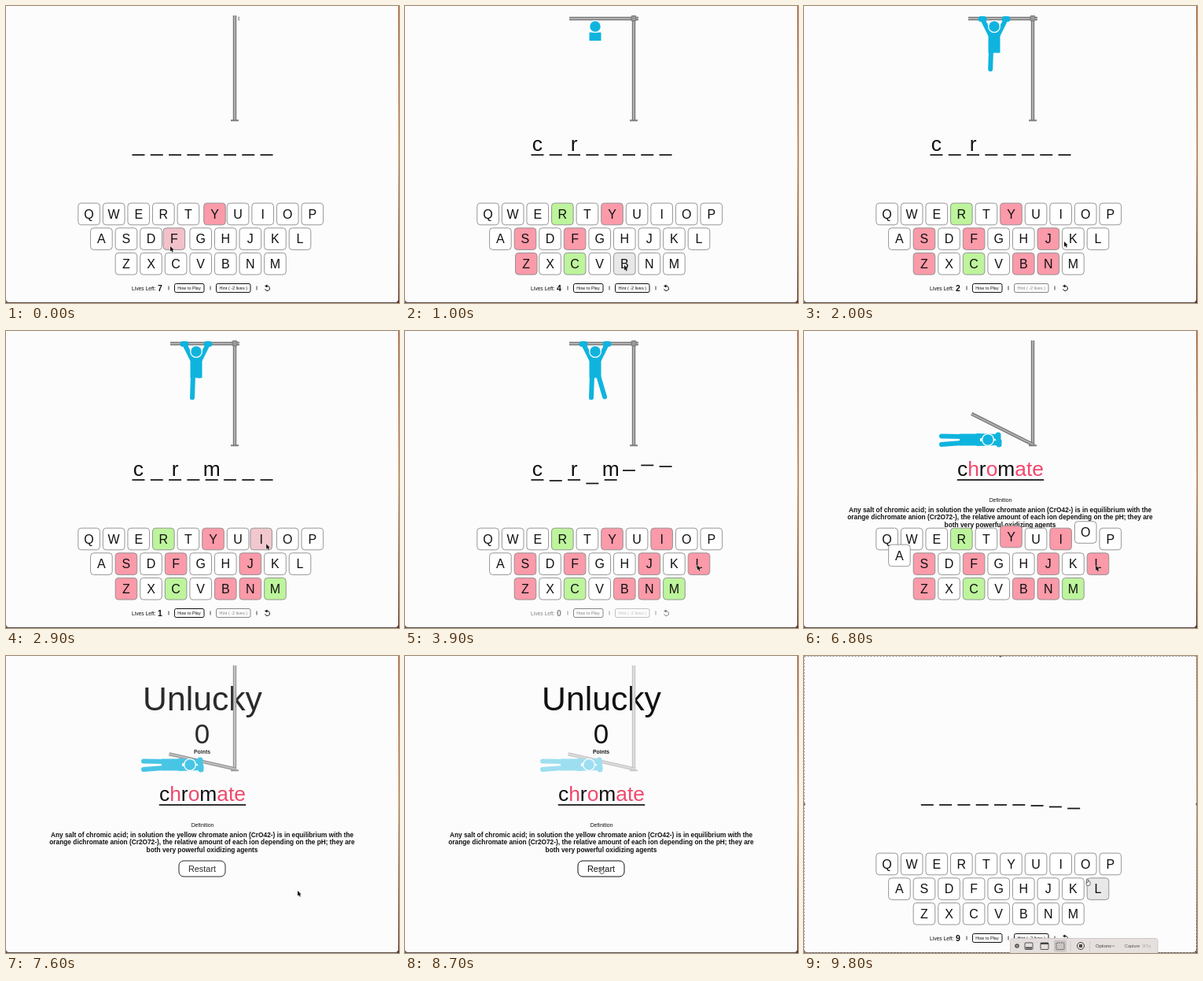
Animation, 500 px wide and 377 px high, one loop 9900 ms. Source, as an HTML page with a canvas:

```html
<!DOCTYPE html>
<html lang="en">
<head>
<meta charset="utf-8">
<title>Word game</title>
<style>
  html, body { margin: 0; height: 100%; overflow: hidden; background: #fcfcfc; }
  canvas { display: block; }
</style>
</head>
<body>
<canvas id="stage" width="500" height="377"></canvas>
<script>
const ctx = document.getElementById("stage").getContext("2d");
const LOOP = 9900, STEP = 100, RESTART = 8900;
const BG = [252, 252, 252], RED = [251, 154, 169], GREEN = [189, 244, 156];
const HOVER = [232, 232, 232], BLUE = [15, 180, 222], INK = "#111";
const WORD = "chromate", ROWS = ["QWERTYUIOP", "ASDFGHJKL", "ZXCVBNM"];
const DEFINITION = [
  "Any salt of chromic acid; in solution the yellow chromate anion (CrO42-) is in equilibrium with the",
  "orange dichromate anion (Cr2O72-), the relative amount of each ion depending on the pH; they are",
  "both very powerful oxidizing agents"
];
const PRESSED = { Y: -300, F: -60, S: 200, R: 450, Z: 650, C: 800, B: 1000,
                  N: 1180, J: 1400, M: 2400, I: 2850, L: 3300 };
const isHit = key => WORD.includes(key.toLowerCase());
const MISSES = Object.keys(PRESSED).filter(k => !isHit(k)).map(k => PRESSED[k]);
const DROP = { A: 6667, O: 6727, Y: 6780 };

// Tracks: time followed by values
const POINTER = [[0, 209, 306], [200, 152, 300], [450, 200, 268], [650, 153, 330], [800, 216, 330],
  [1000, 279, 330], [1180, 310, 330], [1400, 310, 300], [1700, 312, 300], [2000, 331, 300],
  [2400, 342, 330], [2850, 326, 268], [3300, 372, 298], [7700, 371, 299], [8400, 250, 272],
  [8900, 250, 272], [9500, 361, 287]];
const BODY = [[4350, 242, 46.5, 0], [4700, 237, 53, 25], [5000, 231.5, 70, 73],
  [5300, 222, 100, 85], [5600, 211, 138, 90]];
// head, left hand, right hand, left foot, right foot
const LIMBS = [[4350, 0, -20.5, -15, -30, 15, -30, -5, 38, 12, 37],
  [5000, -2, -18, -21, -26, 28, -18, -21, 34, 9, 40],
  [5600, 0, -23, -4, -36, 4, -37, -4.5, 36, 6, 36]];
const BEAM_SWING = [[4350, 180], [4600, 160], [5000, 94]];
const BEAM_FALL = [[5000, 288, 54.5, 94], [5250, 289, 70, 90], [5500, 290, 101, 85],
  [6100, 284, 103, 70], [6500, 270, 112, 46], [6800, 252, 124.5, 26.6], [7100, 250, 133, 14], [7600, 250, 134, 12.8]];
const WAVE = [[0, 0], [1.5, -17], [2.2, -20.5], [3.5, -12], [5.5, 4.5], [6.5, 2.5], [7.5, 1], [8.5, 0]];

const clamp = x => Math.max(0, Math.min(1, x));
const lerp = (a, b, k) => a + (b - a) * k;
const ramp = (t, from, to) => clamp((t - from) / (to - from));
const smooth = k => k * k * (3 - 2 * k);
const mix = (a, b, k) => `rgb(${a.map((v, i) => Math.round(lerp(v, b[i], k)))})`;
const random = n => { const s = Math.sin(n * 127.1) * 43758.5; return s - Math.floor(s); };

function track(t, keys) {
  const next = keys.findIndex(k => k[0] > t);
  if (next === 0) return keys[0].slice(1);
  if (next < 0) return keys[keys.length - 1].slice(1);
  const a = keys[next - 1], b = keys[next];
  return a.slice(1).map((v, i) => lerp(v, b[i + 1], (t - a[0]) / (b[0] - a[0])));
}

function text(str, x, y, size, { bold = false, color = INK, align = "center" } = {}) {
  ctx.font = `${bold ? "bold " : ""}${size}px "Liberation Sans", Arial, sans-serif`;
  ctx.textAlign = align;
  ctx.fillStyle = color;
  ctx.fillText(str, x, y);
}

function line(x1, y1, x2, y2, width, color, cap = "butt") {
  ctx.lineWidth = width;
  ctx.strokeStyle = color;
  ctx.lineCap = cap;
  ctx.beginPath();
  ctx.moveTo(x1, y1);
  ctx.lineTo(x2, y2);
  ctx.stroke();
}

function box(x, y, w, h, r, fill, stroke, width = 1) {
  ctx.beginPath();
  ctx.roundRect(x, y, w, h, r);
  if (fill) { ctx.fillStyle = fill; ctx.fill(); }
  if (stroke) { ctx.strokeStyle = stroke; ctx.lineWidth = width; ctx.stroke(); }
}

function disc(x, y, r, fill) {
  ctx.beginPath();
  ctx.arc(x, y, r, 0, 7);
  ctx.fillStyle = fill;
  ctx.fill();
}

function withAlpha(alpha, draw) {
  if (alpha <= 0) return;
  ctx.save();
  ctx.globalAlpha = alpha;
  draw();
  ctx.restore();
}

function drawDesktop() {
  const edge = ctx.createLinearGradient(0, 0, 0, 377);
  edge.addColorStop(0, "#b5532c");
  edge.addColorStop(0.5, "#e0a070");
  edge.addColorStop(1, "#5a2a22");
  ctx.fillStyle = edge;
  ctx.fillRect(0, 0, 500, 377);
  ctx.fillStyle = "#5c5252";
  ctx.fillRect(0, 374, 498, 3);
  box(0, -9, 499, 385, 4, mix(BG, BG, 0));
}

function rod(x1, y1, x2, y2, fade) {
  line(x1, y1, x2, y2, 4.4, mix([118, 118, 118], BG, fade));
  line(x1, y1, x2, y2, 2, mix([176, 176, 176], BG, fade));
}

function drawGallows(t, grow, fade) {
  rod(291, 145, 291, lerp(145, 12, grow(0)), fade);
  line(286, 145.3, 296, 145.3, 2, mix([125, 125, 125], BG, fade));
  const size = grow(1);
  if (size <= 0) return;
  if (t < 4350) {
    rod(297, 16, lerp(297, 209, size), 16, fade);
    if (size > 0.1) box(288, 12.5, 6, 6.5, 1, "#999", "#777");
    return;
  }
  let [x, y, angle] = track(t, BEAM_FALL);
  if (t < 5000) {
    [angle] = track(t, BEAM_SWING);
    x = 291 + 43 * Math.cos(angle * Math.PI / 180);
    y = 13 + 43 * Math.sin(angle * Math.PI / 180);
  }
  const dx = 43.5 * Math.cos(angle * Math.PI / 180), dy = 43.5 * Math.sin(angle * Math.PI / 180);
  rod(x - dx, y - dy, x + dx, y + dy, fade);
}

function drawFigure(t, grow, fade) {
  const color = mix(BLUE, BG, fade);
  const [x, y, angle] = track(t, BODY);
  const [headX, headY, ...ends] = track(t, LIMBS);
  const joints = [[-5, -10], [5, -10], [-4, 10], [4, 10]];
  ctx.save();
  ctx.translate(x, y);
  ctx.rotate(angle * Math.PI / 180);
  if (grow(3) > 0) line(0, -13, 0, lerp(-13, 13, grow(3)), 15, color);
  joints.forEach(([jx, jy], i) => {
    const size = grow(4 + i);
    if (size <= 0) return;
    const ex = lerp(jx, ends[2 * i], size), ey = lerp(jy, ends[2 * i + 1], size);
    line(jx, jy, ex, ey, 6, color, "round");
    if (i < 2 && size > 0.8) line(ex - 2, ey, ex + 2, ey, 7, color, "round");
  });
  if (grow(2) > 0) {
    disc(headX, headY, 8 * grow(2), mix(BG, BG, 0));
    disc(headX, headY, 6.7 * grow(2), color);
  }
  ctx.restore();
}

function drawSlots(count, y, start, t) {
  for (let i = 0; i < count; i++) {
    const x = 250 + (i - (count - 1) / 2) * 23.3;
    const [dy] = track((t - start) / 60 - i, WAVE);
    withAlpha(ramp(t, start + i * 50, start + i * 50 + 150), () => line(x - 8, y + dy, x + 8, y + dy, 1.7, INK));
  }
}

function drawWord(t) {
  const join = smooth(ramp(t, 5100, 5600));
  ctx.font = '26.4px "Liberation Sans", Arial, sans-serif';
  const widths = [...WORD].map(c => ctx.measureText(c).width);
  let left = 250 - widths.reduce((a, b) => a + b) / 2;
  [...WORD].forEach((letter, i) => {
    const w = widths[i], time = PRESSED[letter.toUpperCase()];
    const guessed = time !== undefined;
    const x = lerp(250 + (i - 3.5) * 23.3, left + w / 2, join);
    const half = lerp(8, w / 2 + 0.2, join);
    const open = guessed && t >= time;
    const dy = open ? 0 : track((t - 3390) / 60 - i, WAVE)[0];
    line(x - half, 189 + dy, x + half, 189 + dy, 1.7, INK);
    withAlpha(guessed ? ramp(t, time, time + 200) : join, () =>
      text(letter, x, 183.5, 26.4, { color: guessed ? INK : "#f2486c" }));
    left += w;
  });
}

function drawKeys(t, fresh, pointer) {
  ROWS.forEach((row, r) => [...row].forEach((key, i) => {
    const x0 = 247.7 + (i - (row.length - 1) / 2) * 31.58, y0 = 264 + r * 31.6;
    let x = x0, y = y0, fill = mix(BG, [255, 255, 255], 1), alpha = 1;
    const seed = key.charCodeAt(0);
    if (fresh) {
      const enter = smooth(ramp(t, 9000 + random(seed) * 200, 9350 + random(seed) * 200));
      y += 30 * (1 - enter);
      alpha = enter;
      const over = Math.abs(pointer[0] - x0) < 14 && Math.abs(pointer[1] - y0) < 14;
      if (over) fill = mix(HOVER, BG, 0);
    } else {
      const age = t - PRESSED[key];
      if (age >= 0) fill = mix(HOVER, isHit(key) ? GREEN : RED, ramp(age, 0, 120));
      if (age >= 0 && age < 600 && !isHit(key)) x -= 3 * Math.sin(age * Math.PI / 200) * (1 - age / 900);
      const fall = Math.max(0, t - (DROP[key] || 6800 + random(seed) * 160));
      y += 0.0006 * fall * fall - 0.16 * fall;
    }
    if (y > 395) return;
    withAlpha(alpha, () => {
      box(x - 13.8, y - 13.8, 27.6, 27.6, 4, fill, "#8c8c8c", 0.9);
      text(key, x, y + 5.6, 16);
    });
  }));
}

function drawStatus(lives, alpha) {
  withAlpha(alpha, () => {
    text("Lives Left:", 160, 360.5, 6.7, { align: "left" });
    text(lives, 196, 361.8, 10.5, { bold: true });
    for (const x of [207, 260, 319]) line(x, 355.5, x, 360.5, 0.8, INK);
    box(214.5, 352.5, 37.5, 11, 2, null, INK);
    text("How to Play", 233, 360, 5.5);
    ctx.lineWidth = 1;
    ctx.strokeStyle = INK;
    ctx.beginPath();
    ctx.arc(332.5, 358.5, 3, -1.9, 2.9);
    ctx.stroke();
    ctx.beginPath();
    ctx.moveTo(329, 355.6);
    ctx.lineTo(332.4, 353.4);
    ctx.lineTo(332.4, 357.6);
    ctx.fillStyle = INK;
    ctx.fill();
  });
  withAlpha(alpha * (lives > 2 ? 1 : 0.5), () => {
    box(267.5, 352.5, 43.5, 11, 2, null, INK);
    text("Hint ( -2 lives )", 289.3, 360, 5.5);
  });
}

function drawResult(t) {
  const leave = 1 - ramp(t, 8800, 9000);
  withAlpha(ramp(t, 5200, 5800) * leave, () => {
    text("Definition", 250, 217, 6.9);
    DEFINITION.forEach((row, i) => text(row, 249.5, 229.6 + i * 9.5, 8.32, { bold: true }));
  });
  withAlpha(ramp(t, 7200, 7650) * leave, () => {
    text("Unlucky", 250, 69, 42.7);
    text("0", 249.5, 110.8, 35);
    text("Points", 249.5, 123.5, 6.9, { bold: true });
    box(220, 260, 59, 20, 6, "#fff", INK);
    text("Restart", 249.5, 273.8, 10.9);
  });
}

function drawPointer([x, y], hand) {
  ctx.save();
  ctx.translate(x, y);
  ctx.lineWidth = 0.8;
  if (hand) {
    box(-2, -1.5, 5, 6, 2, "#fff", "#444", 0.8);
    box(-1.5, -4, 1.8, 5, 0.9, "#fff", "#444", 0.8);
  } else {
    ctx.beginPath();
    for (const [px, py] of [[0, -1], [0, 5.5], [1.5, 4.2], [2.6, 6.6], [3.8, 6], [2.8, 3.8], [4.6, 3.6]]) ctx.lineTo(px, py);
    ctx.closePath();
    ctx.strokeStyle = "#fff";
    ctx.stroke();
    ctx.fillStyle = INK;
    ctx.fill();
  }
  ctx.restore();
}

function drawCaptureBar() {
  ctx.setLineDash([2, 2]);
  box(0.5, 0.5, 499, 376, 0, null, "#999");
  ctx.setLineDash([]);
  for (const [x, y] of [[250, 0], [0, 188], [500, 188]]) disc(x, y, 1.6, "#555");
  box(262.5, 358.5, 187.5, 24, 3, "rgba(228,222,221,0.96)", "#cfc8c7");
  disc(271, 368, 2.8, "#555");
  text("×", 271, 370, 5.5, { color: "#eee" });
  box(318, 360.5, 16, 15, 2, "#cac4c3");
  for (const x of [281, 301, 321]) {
    ctx.setLineDash(x === 321 ? [1.5, 1] : []);
    box(x, 364, 10, 8.5, 1, null, "#444", 0.9);
    ctx.setLineDash([]);
  }
  line(282, 370.5, 290, 370.5, 2, "#444");
  line(301, 365, 311, 365, 2, "#444");
  for (const x of [339, 363.5]) line(x, 362, x, 375, 0.6, "#c4bdbc");
  box(347.5, 363.5, 9, 9, 4.5, null, "#444");
  box(350, 366, 4, 4, 0.5, "#444");
  text("Options", 371, 370, 5.8, { align: "left", color: "#444" });
  ctx.lineWidth = 0.7;
  ctx.beginPath();
  ctx.moveTo(392, 367.5);
  ctx.lineTo(393.5, 369);
  ctx.lineTo(395, 367.5);
  ctx.strokeStyle = "#444";
  ctx.stroke();
  text("Capture", 408, 370, 5.4, { align: "left", color: "#555" });
  text("⌘5a", 430, 370, 5.4, { align: "left", color: "#b5aeae" });
}

function render(t) {
  const fresh = t >= RESTART;
  const pointer = track(t, POINTER);
  const lives = fresh ? 9 : 9 - MISSES.filter(time => t >= time).length;
  const grow = i => i ? smooth(ramp(t, MISSES[i], MISSES[i] + 800)) : 1;
  const fade = Math.max(0.6 * ramp(t, 7400, 7900), ramp(t, 8800, 9000));

  drawDesktop();
  drawResult(t);
  if (t < 9000) {
    drawGallows(t, grow, fade);
    drawFigure(t, grow, fade);
  }
  if (fresh) drawSlots(9, 189, 8990, t);
  else drawWord(t);
  drawKeys(t, fresh, pointer);
  drawStatus(lives, fresh ? ramp(t, 9050, 9400) : 1 - ramp(t, 3700, 4100));
  drawPointer(pointer, t >= 8400);
  if (t >= 9700) drawCaptureBar();
}

const begin = performance.now();
function tick() {
  const t = (performance.now() - begin) % LOOP;
  render(Math.floor(t / STEP) * STEP);
  requestAnimationFrame(tick);
}
tick();
</script>
</body>
</html>
```
